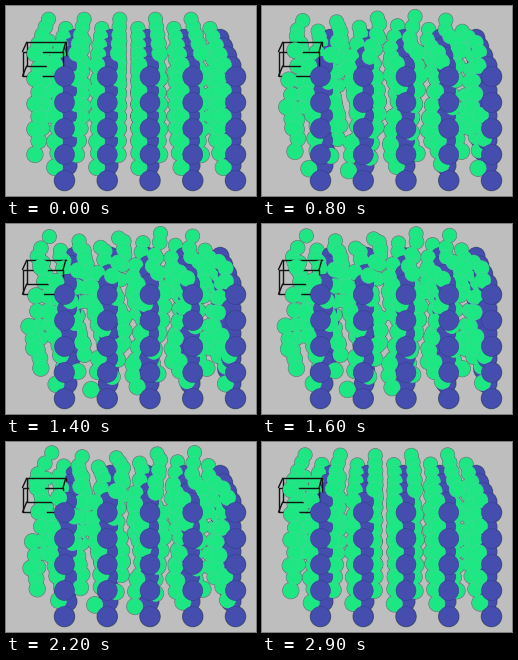
A matplotlib script for the animation above (3 s loop, 250 by 190 pixels).

```python
from itertools import product
import numpy as np
import matplotlib.pyplot as plt
from matplotlib.animation import FuncAnimation
from matplotlib.patches import Circle

W, H, DPI = 250, 190, 100
FRAMES, INTERVAL = 30, 100
PX = 72 / DPI
N = 5                      # cells along each axis
CENTER, HORIZON = 124, -193
RISE = 0.608               # cell height relative to its width
SWING = 0.073              # wave amplitude relative to cell width
SLOPE = -0.75              # screen direction of the vibration
STEP = np.radians((-88, 90, 67))   # phase step per column, level, layer
BLUE, GREEN = "#454dae", "#1ce783"

fig = plt.figure(figsize=(W / DPI, H / DPI), dpi=DPI, facecolor="#bebebe")
ax = fig.add_axes([0, 0, 1, 1])
ax.set_xlim(-0.5, W - 0.5)
ax.set_ylim(H - 0.5, -0.5)
ax.axis("off")


def project(u, v, depth):
    """Screen x, y and cell width; u runs right, v down, depth in layers."""
    s = 1 / (0.02339 + 0.001 * depth)
    return CENTER + s * u, HORIZON + s * v, s


class Atom:
    def __init__(self, u, v, depth, radius, color, rim, phase=None):
        self.x, self.y, self.s = project(u, v, depth)
        self.phase = phase
        r = radius * self.s
        shade = Circle((self.x, self.y), r, facecolor="none", edgecolor="#2f4a48",
                       alpha=0.7, linewidth=1.6 * PX, zorder=0)
        ball = Circle((self.x, self.y), r, facecolor=color, edgecolor=rim,
                      linewidth=0.5 * PX, zorder=self.s)
        self.parts = [ax.add_patch(shade), ax.add_patch(ball)]

    def move(self, angle):
        if self.phase is None:
            return
        d = SWING * self.s * (np.cos(angle + self.phase) - np.cos(self.phase))
        for part in self.parts:
            part.center = self.x + d, self.y + SLOPE * d


def sublattice(order, u, radius, color, rim, phase=None):
    """One atom per cell; each further order sits higher and deeper."""
    atoms = []
    for col, level, layer in product(range(N), repeat=3):
        v = 6.152 - 0.19 * order + RISE * (N - 1 - level)
        phi = None
        if phase is not None:
            phi = np.radians(phase) + STEP @ (col, level - N + 1, layer - N + 1)
        atoms.append(Atom(u + col, v, layer + order / 3, radius, color, rim, phi))
    return atoms


def draw_cell(u, v, depth):
    corners = list(product((0, 1), repeat=3))
    for a, b in product(corners, repeat=2):
        if a < b and sum(p != q for p, q in zip(a, b)) == 1:
            x, y, s = zip(*(project(u + i, v + RISE * j, depth + k)
                            for i, j, k in (a, b)))
            ax.plot(x, y, color="#141414", lw=1.4 * PX,
                    zorder=sum(s) / 2 + 0.9, solid_capstyle="round")


atoms = (sublattice(0, -1.544, 0.233, BLUE, "#343b8c")
         + sublattice(1, -1.795, 0.187, GREEN, "#4fd59a", 17)
         + sublattice(2, -2.3, 0.187, GREEN, "#4fd59a", 105))
draw_cell(-2.66, 5.862, 1.24)


def update(i):
    for atom in atoms:
        atom.move(2 * np.pi * i / FRAMES)
    return []


anim = FuncAnimation(fig, update, frames=FRAMES, interval=INTERVAL,
                     repeat=True, repeat_delay=0, blit=False)
plt.show()
```
